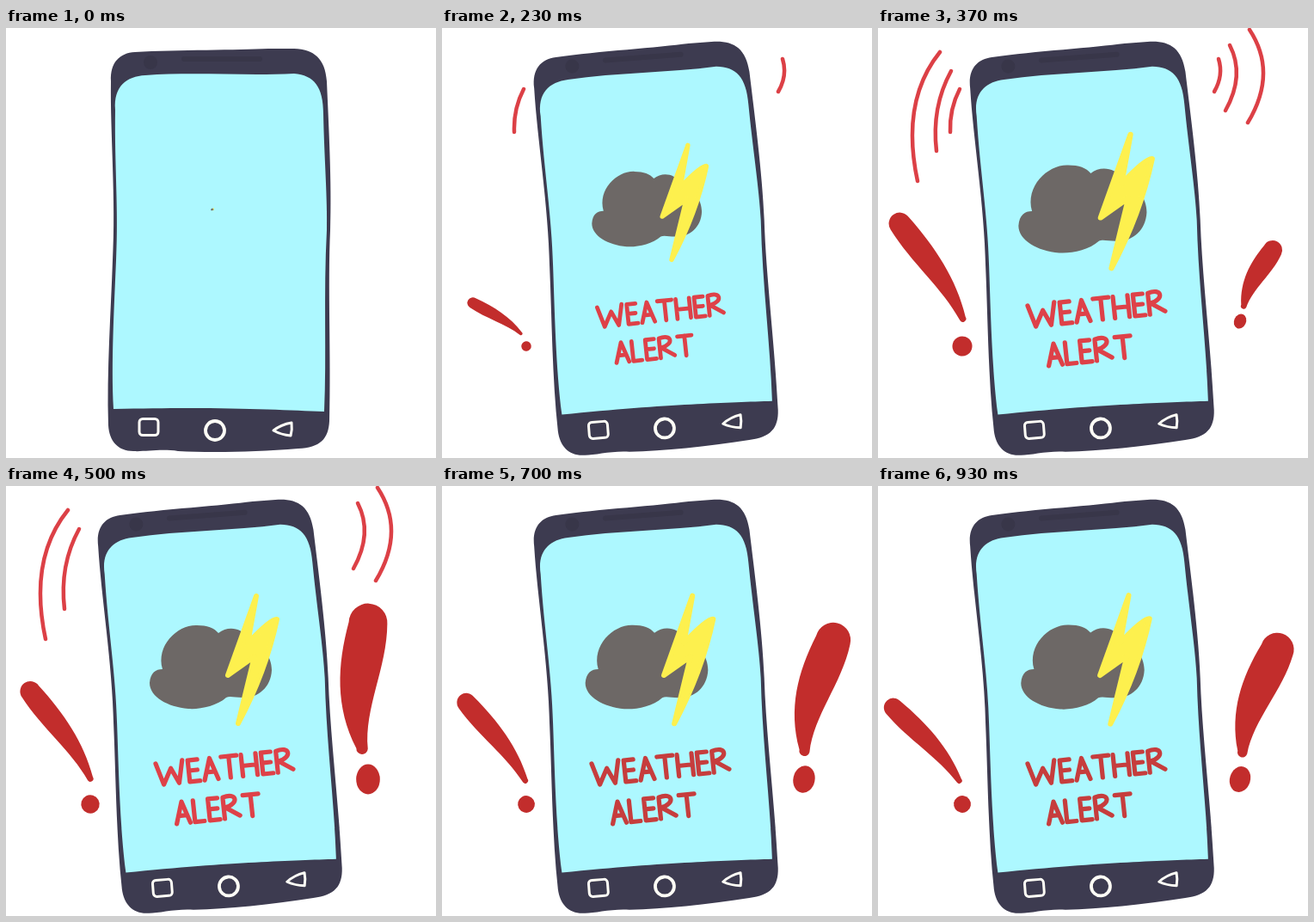
Write an HTML page that moves like this. It is 500 px wide and 500 px high and loops after 1010 ms.

```html
<!DOCTYPE html>
<html lang="en">
<head>
<meta charset="utf-8">
<title>Weather alert</title>
<style>
  html, body { margin: 0; width: 100%; height: 100%; overflow: hidden; background: #fff; }
  svg { display: block; width: 100%; height: 100%; }
  .line { fill: none; stroke-linecap: round; stroke-linejoin: round; }
</style>
</head>
<body>
<svg viewBox="0 0 500 500" role="img" aria-label="WEATHER ALERT">
  <g id="phone">
    <path fill="#3d3b50" d="M122 62C121 40 132 29 150 28C200 25 270 26 305 24L335 24C358 25 371 35 373 62C375 110 379 180 377 235C374 300 378 380 376 457C375 478 365 488 340 489C290 493 240 494 200 492C180 489 160 493 148 492C130 492 120 480 119 462C117 400 122 330 124 270C128 200 121 120 122 62Z"/>
    <path class="line" stroke="#383649" stroke-width="6" d="M207 36H295"/>
    <circle cx="168" cy="40" r="8" fill="#383649"/>
    <path fill="#adf8ff" d="M127 95C125 68 140 56 162 55C220 51 280 56 335 53C358 55 369 68 369 100C370 150 374 200 373 235C369 310 373 380 370 446C320 444 250 440 125 443C122 390 126 320 128 270C131 210 126 160 127 95Z"/>
    <g class="line" stroke="#fffef6" stroke-width="3">
      <rect x="155" y="454.5" width="22" height="19" rx="4"/>
      <circle cx="243" cy="468" r="11" stroke-width="3.8"/>
      <path d="M311 468Q320 461 332 459Q333 467 331 474Q320 473 311 468Z"/>
    </g>
  </g>
  <g id="storm">
    <path fill="#6d6866" d="M182 213C174 185 200 161 222 162C234 162 242 165 247 171C258 162 274 165 281 176C298 184 309 198 309 214C308 235 292 247 275 246C266 246 260 244 256 246C245 256 225 260 212 259C188 257 167 245 167 229C168 217 174 213 182 213Z"/>
    <path fill="#fdf04e" stroke="#fdf04e" stroke-width="6" stroke-linejoin="round" d="M291 128L258 220L289 198L270 276Q302 216 315 155Q309 153 281 183Z"/>
  </g>
  <g id="words" class="line" stroke-width="5.2"></g>
  <g id="arcs" class="line" stroke="#dc4046" stroke-width="4.5">
    <path d="M95 71Q83 94 84 121M396 36Q402 55 391 74"/>
    <path d="M85 50Q62 92 68 143M409 20Q427 55 404 96"/>
    <path d="M72 28Q26 85 46 178M432 2Q465 52 430 110"/>
  </g>
  <g id="marks" fill="#c22d2c"></g>
</svg>
<script>
const el = id => document.getElementById(id);
const LOOP = 1010;
const STEPS = [0, 100, 170, 230, 300, 370, 430, 500, 570, 630, 700, 800, 870, 930];

// Hand lettering: width and strokes of each glyph
const GLYPHS = {
  W: [31, "M0 0L7 25L17 7L25 25L31 -1"],
  E: [13, "M12 0H1V25H13M1 12H11"],
  A: [16, "M0 25L8 0L16 25M3 16H13"],
  T: [18, "M0 0H18M9 0V25"],
  H: [17, "M0 0V25M17 0V25M0 13H17"],
  R: [18, "M0 25V0C17 -5 19 9 2 12L18 23"],
  L: [11, "M0 0V25H11"]
};

function write(word, x, y) {
  let pen = 0, out = "";
  for (const c of word) {
    const [width, d] = GLYPHS[c];
    out += `<path transform="translate(${pen})" d="${d}"/>`;
    pen += width + 5.4;
  }
  el("words").innerHTML += `<g transform="translate(${x} ${y}) rotate(-6)">${out}</g>`;
}

// Exclamation mark standing on its dot, 100 units tall; r is the head radius.
function exclamation(r, bend, rx, ry) {
  const a = bend * Math.PI / 180, tx = -20 * Math.sin(a), ty = -20 * Math.cos(a);
  const len = Math.hypot(tx, ty + 100), dx = tx / len, dy = (ty + 100) / len, w = r * .3;
  const pt = (along, off) => `${dx * along * len - dy * off} ${dy * along * len - 100 + dx * off}`;
  return `<path d="M${pt(0, r)}C${pt(.35, r * 1.5)} ${pt(.68, r * 1.5)} ${pt(1, w)}
    A${w} ${w} 0 0 0 ${pt(1, -w)}C${pt(.68, 0)} ${pt(.35, r * -1.1)} ${pt(0, -r)}
    A${r} ${r} 0 0 0 ${pt(0, r)}Z"/><ellipse rx="${rx}" ry="${ry}"/>`;
}

// Keys: [time, ...values]
const TILT = [[0, 0], [170, -4.4]];
const STORM = [[0, .025], [230, .9], [370, 1.05], [500, 1], [930, 1.01]];
const WORDS = [[0, 0], [230, .92], [370, 1]];
// Keys of a mark: time, lean in degrees, size
const MARKS = [
  { x: 98, y: 370, flip: -1, shape: exclamation(8, 28, 7.2, 7.2),
    keys: [[230, 51, .8], [370, 27, 1.6], [630, 29, 1.37], [930, 35.5, 1.38]] },
  { x: 421, y: 341, flip: 1, shape: exclamation(12.3, 11, 7.6, 9.6),
    keys: [[370, 24.6, .91], [500, 0, 1.82], [800, 17.7, 1.57], [930, 16, 1.57]] }
];

function at(keys, t) {
  const i = keys.findIndex(k => k[0] > t);
  if (i < 0) return keys.at(-1).slice(1);
  if (i === 0) return keys[0].slice(1);
  const a = keys[i - 1], b = keys[i], p = (t - a[0]) / (b[0] - a[0]);
  return a.slice(1).map((v, j) => v + (b[j + 1] - v) * p);
}

const move = (node, transform) => node.setAttribute("transform", transform);
const show = (node, on) => node.style.display = on ? "" : "none";

function zoom(id, x, y, s) {
  move(el(id), `translate(${x} ${y}) scale(${s}) translate(${-x} ${-y})`);
}

function draw(t) {
  move(el("phone"), `rotate(${at(TILT, t)[0]} 218 259)`);
  zoom("storm", 240, 211, at(STORM, t)[0]);
  zoom("words", 254.5, 349, at(WORDS, t)[0]);
  show(el("words"), t > 0);
  el("words").setAttribute("stroke", t < 600 ? "#de4148" : "#c63d3d");
  [...el("arcs").children].forEach((arc, i) => show(arc, t >= 230 + 70 * i && t < 500 + 65 * i));
  MARKS.forEach(({ x, y, flip, keys }, i) => {
    const [lean, size] = at(keys, t), node = el("marks").children[i];
    show(node, t >= keys[0][0]);
    move(node, `translate(${x} ${y}) scale(${flip * size} ${size}) rotate(${lean})`);
  });
}

function tick() {
  const now = performance.now() % LOOP;
  draw(STEPS.findLast(s => s <= now));
  requestAnimationFrame(tick);
}

write("WEATHER", 174, 323);
write("ALERT", 196, 368);
el("marks").innerHTML = MARKS.map(m => `<g>${m.shape}</g>`).join("");
tick();
</script>
</body>
</html>
```
